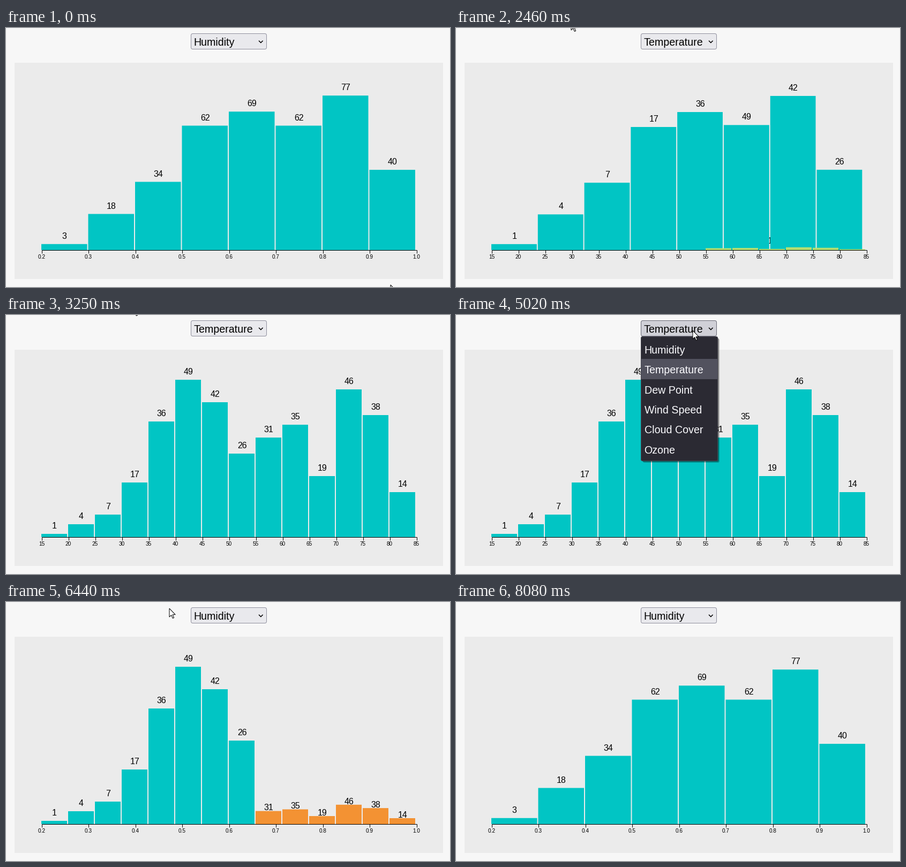
A matplotlib script that plays this animation: 829x484 px, repeating every 8920 ms.

```python
import numpy as np
import matplotlib.pyplot as plt
from matplotlib.animation import FuncAnimation
from matplotlib.colors import to_rgb
from matplotlib.patches import FancyBboxPatch, Polygon, Rectangle

W, H, DPI = 829, 484, 72
LOOP, STEP = 8920, 40
LEFT, WIDTH, BASE, HEIGHT = 66, 700, 415, 300
RIGHT = LEFT + WIDTH
TEAL, LIME, ORANGE = (np.array(to_rgb(c)) for c in ("#01c5c4", "#b8de6f", "#f39233"))
MENU_FONT = dict(ha="left", size=19.6)
OPTIONS = ["Humidity", "Temperature", "Dew Point", "Wind Speed", "Cloud Cover", "Ozone"]
ROW_TOP, ROW_H = 44.7, 37.3

HUMIDITY = dict(counts=[3, 18, 34, 62, 69, 62, 77, 40], lo=0.2, hi=1.0, peak=80, fmt="%.1f")
TEMPERATURE = dict(counts=[1, 4, 7, 17, 36, 49, 42, 26, 31, 35, 19, 46, 38, 14],
                   lo=15, hi=85, peak=50, fmt="%d")
SLOTS = len(TEMPERATURE["counts"])
SHARED = len(HUMIDITY["counts"])

# Timeline in ms
TO_TEMP, TO_HUM = 1292, 5780
CLOSE_LAG = 100
PHASE, AXIS_MS = 1000, 250
MENU_OPEN = [(660, TO_TEMP - CLOSE_LAG), (4710, TO_HUM - CLOSE_LAG)]

# Pointer: each glide starts at a time and heads for a point
POINTER_START, POINTER_END = (718, 480), 8080
GLIDE = 430
GLIDES = [(70, 430, 28), (640, 418, 96), (2030, 215, -12), (2800, 237, -17),
          (3950, 442, 29), (5040, 412, 62), (6000, 305, 12)]


def ease(u):
    u = min(max(u, 0), 1)
    return 4 * u ** 3 if u < 0.5 else 1 - 4 * (1 - u) ** 3


def smooth(u):
    u = min(max(u, 0), 1)
    return u * u * (3 - 2 * u)


def lerp(a, b, p):
    return a + (b - a) * p


def bar_box(data, k):
    """x, width, height and label centre of bin k."""
    w = WIDTH / len(data["counts"])
    x = LEFT + k * w
    return np.array([x, w - 2, HEIGHT * data["counts"][k] / data["peak"], x + w / 2])


def tick_x(data, v):
    return LEFT + 0.5 + (v - data["lo"]) / (data["hi"] - data["lo"]) * WIDTH


def pointer_at(t):
    spot = np.array(POINTER_START, float)
    for start, *goal in GLIDES:
        spot = lerp(spot, np.array(goal), smooth((t - start) / GLIDE))
    return spot


fig = plt.figure(figsize=((W + 1e-6) / DPI, (H + 1e-6) / DPI), dpi=DPI, facecolor="#f7f7f7")
ax = fig.add_axes([0, 0, 1, 1])
ax.set_xlim(0, W)
ax.set_ylim(H, 0)
ax.axis("off")


def rect(x, y, w, h, color, z, **kw):
    return ax.add_patch(Rectangle((x, y), w, h, facecolor=color, lw=0, zorder=z, **kw))


def rounded(x, y, w, h, r, face, edge, z, **kw):
    style = f"round,pad=0,rounding_size={r}"
    return ax.add_patch(FancyBboxPatch((x, y), w, h, boxstyle=style, facecolor=face,
                                       edgecolor=edge, zorder=z, **kw))


def text(x, y, s, z, color="black", ha="center", size=16):
    return ax.text(x, y, s, color=color, ha=ha, va="baseline",
                   family="Liberation Sans", size=size, zorder=z)


def line(xs, ys, z, lw=1):
    return ax.plot(xs, ys, color="black", lw=lw, zorder=z, solid_joinstyle="miter",
                   solid_capstyle="butt")[0]


# Chart
panel = rect(16, 65, 800, 404, "#ebebeb", 1)
bars = [rect(0, BASE, 0, 0, TEAL, 3 if k < SHARED else 4, snap=False) for k in range(SLOTS)]
labels = [text(0, 0, "", 5) for _ in range(SLOTS)]
line([LEFT + 0.5, RIGHT + 0.5], [BASE + 0.5] * 2, 6)


def make_ticks(data):
    ticks = []
    for v in np.linspace(data["lo"], data["hi"], len(data["counts"]) + 1):
        parts = (line([0, 0], [BASE, BASE + 6], 6),
                 text(0, BASE + 16, data["fmt"] % round(v, 1), 6, size=10))
        for part in parts:
            part.set_clip_on(True)
            part.set_clip_path(panel)
        ticks.append((v, *parts))
    return ticks


tick_sets = [(d, make_ticks(d)) for d in (HUMIDITY, TEMPERATURE)]

# Select box
select = rounded(345.5, 10.5, 141, 29, 3.5, "#e9e9ed", "#8f8f9d", 8, lw=1)
choice = text(350.5, 33, "", 9, **MENU_FONT)
line([472, 475.8, 479.6], [23.7, 27.5, 23.7], 9, lw=1.5)

# Drop-down list
menu = [rounded(346 + d, 41 + d, 143, 232, 3, "black", "none", 10, alpha=0.2, lw=0)
        for d in (1, 2, 3)]
menu.append(rounded(345.5, 40.5, 143, 232, 2.5, "#2b2a33", "#45454f", 11, lw=1))
highlight = rect(346, 82, 142, 38, "#52525e", 12)
menu.append(highlight)
menu += [text(351.5, 72 + ROW_H * i, s, 13, "#fbfbfe", **MENU_FONT)
         for i, s in enumerate(OPTIONS)]

ARROW = np.array([(0, 0), (0, 16), (3.7, 12.5), (6.3, 18.4), (8.6, 17.4),
                  (6.1, 11.6), (11.2, 11.6)])
pointer = ax.add_patch(Polygon(ARROW, closed=True, facecolor="white", edgecolor="black",
                               lw=1, joinstyle="miter", zorder=20))


def draw_bars(old, new, age):
    leave = ease(age / PHASE)
    move = ease((age - PHASE) / PHASE)
    moving = age >= PHASE
    n_old, n_new = len(old["counts"]), len(new["counts"])
    for k, (bar, label) in enumerate(zip(bars, labels)):
        color, gap, z, shown = TEAL, 10, 5, True
        source = new if moving else old
        if k < min(n_old, n_new):
            x, w, h, mid = lerp(bar_box(old, k), bar_box(new, k), move)
        elif k < n_new:
            x, w, h, mid = bar_box(new, k)
            h *= move
            color = lerp(LIME, TEAL, move)
            z = 2 if move < 1 else 5
            shown = moving
        elif k < n_old:
            x, w, h, mid = bar_box(old, k)
            h *= 1 - leave
            gap *= 1 - leave
            color = ORANGE
            source, shown = old, leave < 1
        else:
            shown = False
        bar.set_visible(shown)
        label.set_visible(shown)
        if shown:
            bar.set_bounds(x, BASE - h, w, h)
            bar.set_facecolor(color)
            label.set_position((mid - 0.4, BASE - h - gap))
            label.set_text(str(source["counts"][k]))
            label.set_zorder(z)


def draw_axis(old, new, age):
    p = ease(age / AXIS_MS)
    for data, ticks in tick_sets:
        alpha = p if data is new else 1 - p
        for v, mark, name in ticks:
            x = lerp(tick_x(old, v), tick_x(new, v), p)
            mark.set_xdata([x, x])
            name.set_x(x)
            for part in (mark, name):
                part.set_visible(alpha > 0.01 and 0 < x < W)
                part.set_alpha(alpha)


def draw_controls(t):
    x, y = pointer_at(t)
    pointer.set_xy(ARROW + (x, y))
    pointer.set_visible(t < POINTER_END)

    chosen = int(TO_TEMP - CLOSE_LAG <= t < TO_HUM - CLOSE_LAG)
    choice.set_text(OPTIONS[chosen])
    is_open = any(a <= t < b for a, b in MENU_OPEN)
    active = is_open or (345 <= x <= 487 and 10 <= y <= 40)
    select.set_facecolor("#d0d0d7" if active else "#e9e9ed")
    select.set_edgecolor("#676774" if active else "#8f8f9d")
    for part in menu:
        part.set_visible(is_open)
    row = int((y - ROW_TOP) // ROW_H) if y > ROW_TOP else chosen
    highlight.set_y(round(ROW_TOP + ROW_H * row))


def update(i):
    t = (i + 0.5) * STEP
    if t < TO_TEMP:
        old, new, age = HUMIDITY, HUMIDITY, 2 * PHASE
    elif t < TO_HUM:
        old, new, age = HUMIDITY, TEMPERATURE, t - TO_TEMP
    else:
        old, new, age = TEMPERATURE, HUMIDITY, t - TO_HUM
    draw_bars(old, new, age)
    draw_axis(old, new, age)
    draw_controls(t)
    return []


anim = FuncAnimation(fig, update, frames=LOOP // STEP, interval=STEP,
                     init_func=lambda: update(0), repeat=True, repeat_delay=0)
plt.show()
```
